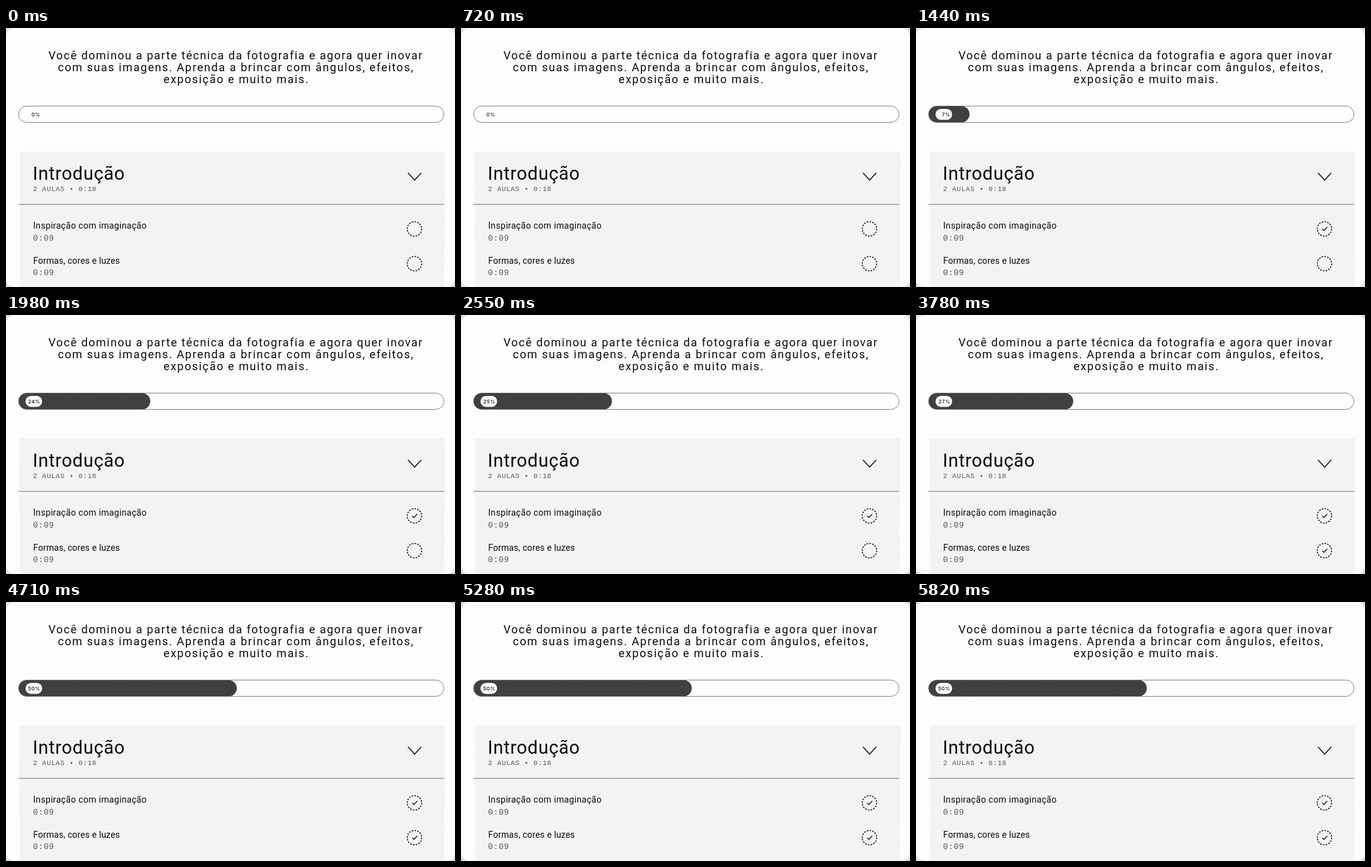
Write an HTML page that moves like this. It is 714 by 413 pixels and loops after 5.85 s.

```html
<!DOCTYPE html>
<html lang="pt">
<head>
<meta charset="utf-8">
<title>Progresso do curso</title>
<style>
  html, body { margin: 0; width: 100%; height: 100%; overflow: hidden; background: #e4e4db; }
  svg { display: block; width: 100vw; height: 100vh; }
  text { font-family: Roboto, Inter, sans-serif; fill: #0c0c0c; white-space: pre; }
  .lead { font-size: 18px; }
  .title { font-size: 29px; letter-spacing: .75px; }
  .lesson { font-size: 14px; }
  .mono { font-family: "Liberation Mono", "DejaVu Sans Mono", monospace; fill: #585858; }
  .percent { font-family: Inter, Roboto, sans-serif; font-size: 8px; font-weight: 500; letter-spacing: .4px; text-anchor: end; }
  .line { fill: none; stroke: #151515; stroke-width: 1.6; }
  .ring { stroke-dasharray: 2.5 2; }
  .check { stroke-width: 1.4; }
</style>
</head>
<body>
<svg viewBox="0 0 714 413">
  <rect width="714" height="413" rx="14" fill="#fdfdfd"/>
  <path id="pageGrain" fill="#f6f6f6"/>
  <path id="panel" fill="#f3f3f3"/>
  <path id="panelGrain" fill="#fbfbfb"/>
  <path id="scratches" fill="none" stroke="#fafafa" stroke-width=".8"/>

  <g class="lead">
    <text x="67.5" y="50" letter-spacing="1.48">Você dominou a parte técnica da fotografia e agora quer inovar</text>
    <text x="82.5" y="69" letter-spacing="1.57">com suas imagens. Aprenda a brincar com ângulos, efeitos,</text>
    <text x="250.5" y="88" letter-spacing="1.6">exposição e muito mais.</text>
  </g>

  <rect id="fill" x="20" y="124.5" height="26" rx="13" fill="#404040"/>
  <path id="barGrain" fill="#4c4c4c"/>
  <rect x="20" y="124.5" width="676.5" height="26" rx="13" fill="none" stroke="#626262" stroke-width=".8"/>
  <rect x="31" y="129" width="26.5" height="17.5" rx="8.75" fill="#fdfdfd"/>
  <text id="percent" class="percent" x="54.5" y="141"></text>

  <text class="title" x="42.6" y="242">Introdução</text>
  <text class="mono" x="43" y="259.5" font-size="11" letter-spacing=".62">2 AULAS • 0:18</text>
  <path d="M20 281.2H697" stroke="#707070" stroke-width="1"/>
  <path class="line" d="M639.2 231 L649.8 242.5 L660.4 231"/>

  <text class="lesson" x="43.2" y="320" letter-spacing=".33">Inspiração com imaginação</text>
  <text class="mono" x="43" y="338.7" font-size="13" letter-spacing=".65">0:09</text>
  <text class="lesson" x="43.2" y="375.5" letter-spacing=".13">Formas, cores e luzes</text>
  <text class="mono" x="43" y="394" font-size="13" letter-spacing=".65">0:09</text>

  <g class="line">
    <circle class="ring" cx="649.5" cy="320.3" r="11.5" pathLength="72"/>
    <circle class="ring" cx="649.5" cy="375.8" r="11.5" pathLength="72"/>
    <path class="check" d="M646 320.5 L648.6 323 L654 317.6" pathLength="1" stroke-dasharray="1 2"/>
    <path class="check" d="M646 376 L648.6 378.5 L654 373.1" pathLength="1" stroke-dasharray="1 2"/>
  </g>
</svg>
<script>
  const LOOP = 5850, GRAIN_STEP = 90, RISE = 1065, CHECK = 200;
  const steps = [
    { start: 1057, percent: 25, width: 220 },
    { start: 3597, percent: 25, width: 127 }
  ];
  const $ = id => document.getElementById(id);
  const checks = document.querySelectorAll(".check");
  const clamp = v => Math.min(1, Math.max(0, v));
  const smooth = u => u * u * (3 - 2 * u);

  // Seeded generator, so the paper grain depends on the time alone
  function seeded(seed) {
    let s = seed * 7919 + 17;
    return () => {
      s = (s + 0x6D2B79F5) | 0;
      let r = Math.imul(s ^ (s >>> 15), 1 | s);
      r = (r + Math.imul(r ^ (r >>> 7), 61 | r)) ^ r;
      return ((r ^ (r >>> 14)) >>> 0) / 4294967296;
    };
  }

  function specks(rnd, count, x, y, w, h, size) {
    let d = "";
    for (let i = 0; i < count; i++) {
      const a = size * (.5 + rnd()), b = size * (.5 + rnd());
      d += `M${(x + rnd() * (w - a)).toFixed(1)} ${(y + rnd() * (h - b)).toFixed(1)}h${a.toFixed(1)}v${b.toFixed(1)}h${-a.toFixed(1)}z`;
    }
    return d;
  }

  // Panel with dry-brush sides that get rougher towards the bottom
  function panelShape(rnd) {
    const left = 20.8 + rnd(), right = 697.6 + rnd() * 1.4;
    let down = "", up = "";
    for (let y = 197; y <= 413; y += 2) {
      const rough = .5 + 2.5 * (y - 197) / 216;
      const bite = () => rnd() ** 2 * rough;
      down += `L${(right - bite()).toFixed(1)} ${y}`;
      up = `L${(left + bite()).toFixed(1)} ${y}` + up;
    }
    return "M" + down.slice(1) + up + "z";
  }

  function scratchLines(rnd) {
    let d = "";
    for (let i = 0; i < 3; i++) {
      const x = 40 + rnd() * 620, y = 205 + rnd() * 180, len = 5 + rnd() * 13;
      d += `M${x} ${y}q${len * .4} ${len * .3} ${len * .7} ${len}`;
    }
    return d;
  }

  function drawGrain(step, width) {
    const rnd = seeded(step);
    const set = (id, d) => $(id).setAttribute("d", d);
    set("panel", panelShape(rnd));
    set("pageGrain", specks(rnd, 45, 4, 14, 706, 385, 1));
    set("panelGrain", specks(rnd, 70, 24, 199, 672, 214, 1));
    set("scratches", scratchLines(rnd));
    set("barGrain", width > 30 ? specks(rnd, Math.round(width / 9), 30, 126, width - 20, 23, .9) : "");
  }

  function draw(t) {
    let width = 0, percent = 0;
    steps.forEach((s, i) => {
      const p = smooth(clamp((t - s.start) / RISE));
      width += s.width * p;
      percent += s.percent * p;
      const drawn = clamp((t - s.start + CHECK) / CHECK);
      checks[i].style.visibility = drawn > 0 ? "visible" : "hidden";
      checks[i].setAttribute("stroke-dashoffset", 1 - drawn);
    });
    $("fill").setAttribute("width", width.toFixed(2));
    $("percent").textContent = Math.round(percent) + "%";
    drawGrain(Math.floor(t / GRAIN_STEP), width);
  }

  function tick() {
    draw(performance.now() % LOOP);
    requestAnimationFrame(tick);
  }
  tick();
</script>
</body>
</html>
```
